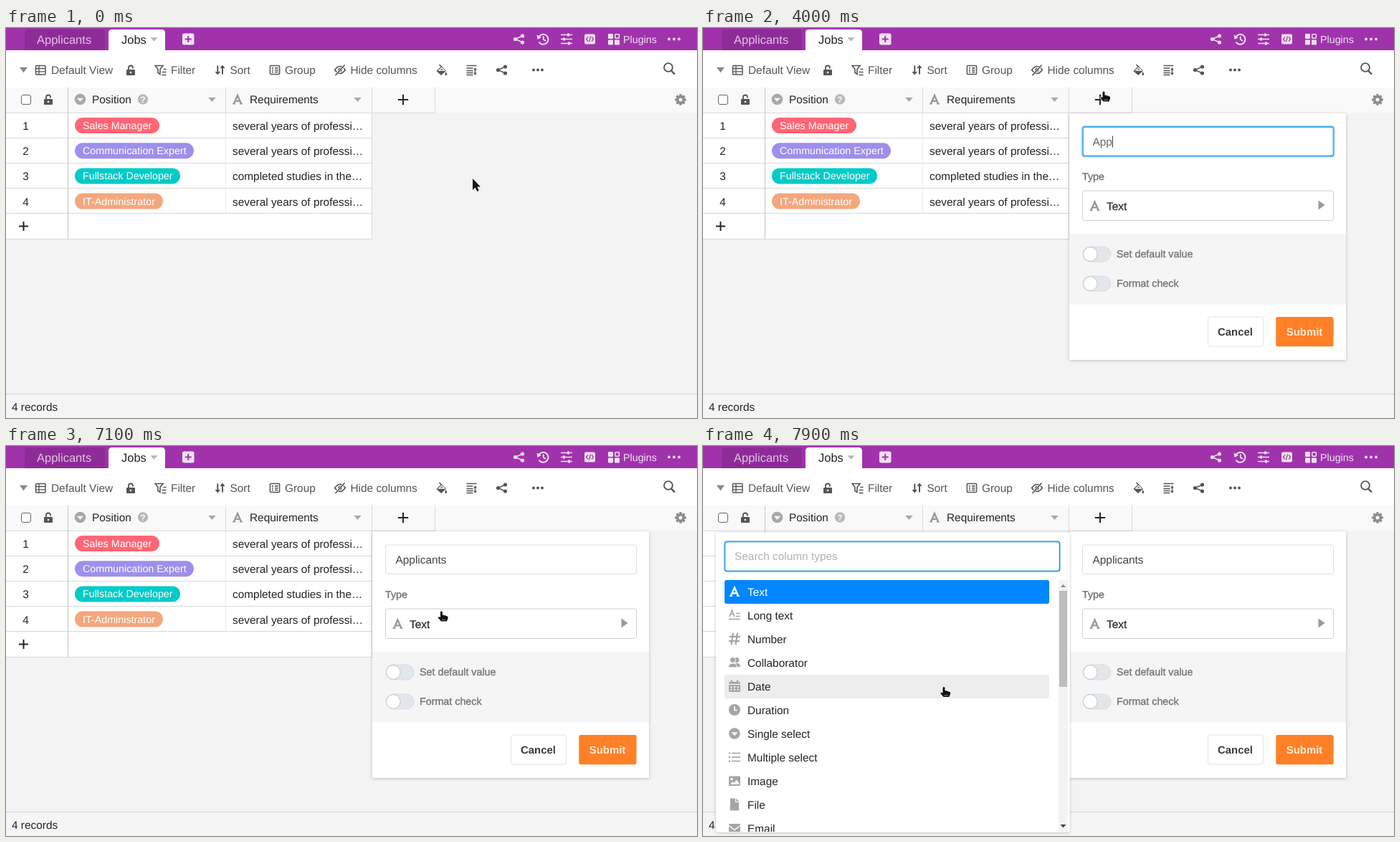
Write an HTML page that moves like this. It is 964 px wide and 544 px high and loops after 8000 ms.

```html
<!DOCTYPE html>
<html lang="en">
<head>
<meta charset="utf-8">
<title>Add a column</title>
<style>
html, body { margin: 0; width: 100%; height: 100%; overflow: hidden; background: #f4f4f4; }
svg { display: block; width: 964px; height: 544px; }
text { font-family: "Liberation Sans", Arial, sans-serif; font-size: 15.4px; text-rendering: geometricPrecision; white-space: pre; }
</style>
</head>
<body>
<svg id="stage" viewBox="0 0 964 544" xmlns="http://www.w3.org/2000/svg"></svg>
<script>
const PURPLE = '#a033ab', INK = '#212529', TOOL = '#555', GRAY = '#a8a8a8', LINE = '#d9d9d9';

// Drawing helpers
const rect = (x, y, w, h, fill, more = '') => `<rect x="${x}" y="${y}" width="${w}" height="${h}" fill="${fill}" ${more}/>`;
const box = (x, y, w, h, fill, stroke, r = 3, sw = 1) => rect(x, y, w, h, fill, `rx="${r}" stroke="${stroke}" stroke-width="${sw}"`);
const text = (x, y, s, fill = INK, size = 15.4, more = '') => `<text x="${x}" y="${y}" fill="${fill}" style="font-size:${size}px" ${more}>${s}</text>`;
const soft = c => `stroke="${c}" stroke-width=".35"`;
const path = (d, fill, more = '') => `<path d="${d}" fill="${fill}" ${more}/>`;
const line = (d, stroke, w = 1, more = '') => `<path d="${d}" fill="none" stroke="${stroke}" stroke-width="${w}" ${more}/>`;
const dot = (x, y, r, fill, more = '') => `<circle cx="${x}" cy="${y}" r="${r}" fill="${fill}" ${more}/>`;
const ring = (x, y, r, stroke, w) => dot(x, y, r, 'none', `stroke="${stroke}" stroke-width="${w}"`);
const at = (x, y, s) => `<g transform="translate(${x} ${y})">${s}</g>`;
const group = (id, s) => `<g id="${id}">${s}</g>`;
const down = (x, y, w, h, fill) => path(`M${x - w / 2} ${y - h / 2}h${w}l${-w / 2} ${h}z`, fill);
const plus = (x, y, r, c = INK, w = 2) => line(`M${x - r} ${y}h${2 * r}M${x} ${y - r}v${2 * r}`, c, w);
const dots = (x, y, gap, c) => [-gap, 0, gap].map(d => dot(x + d, y, 2, c)).join('');

// Icons, centred on 0,0
const icon = {
  share: c => line('M5-4.5L-5 0L5 4.5', c, 1.5) + dot(-5, 0, 2.6, c) + dot(5, -4.5, 2.6, c) + dot(5, 4.5, 2.6, c),
  lock: c => rect(-6, -1, 12, 8, c, 'rx="1"') + line('M-3-1V-3.5A3 3 0 0 1 3-3.5V-2.5', c, 1.8) + dot(0, 3, 1.3, '#fff'),
  letter: c => line('M-5 6L0-5.5L5 6M-3.5 2.4H3.5', c, 2.4) + line('M-7 6.2H-3M3 6.2H7', c, 1.4),
  select: c => dot(0, 0, 7.8, c) + down(0, .8, 9, 5, '#fff'),
  history: c => line('M-6.2-3A7 7 0 1 1-6 4', c, 2) + path('M-9-6L-8 .5L-2.5-2.5z', c) + line('M.3-4V.5L3.5 2.5', c, 1.8),
  sliders: c => line('M-8-6H8M-8 0H8M-8 6H8', c, 1.7) + rect(1, -8, 3, 4, c) + rect(-5, -2, 3, 4, c) + rect(2, 4, 3, 4, c),
  code: c => rect(-7.5, -7, 15, 14, c, 'rx="2"') + line('M-2.5-3L-5 0L-2.5 3M2.5-3L5 0L2.5 3M1-4L-1 4', PURPLE, 1.2),
  plugins: c => rect(-8, -7.5, 7, 7, c, 'rx="1"') + rect(-8, 1, 7, 7, c, 'rx="1"') + rect(1, 1, 7, 7, c, 'rx="1"') + box(1.8, -6.8, 5.6, 5.6, 'none', c, 1, 1.5),
  table: c => box(-6.5, -6, 13.5, 12.5, 'none', c, 1, 1.5) + line('M-6-2H7M-6 2.3H7M-2-6V6', c, 1.3),
  filter: c => line('M-7.3-6H3.5L-.5-1V6L-3.5 4V-1z', c, 1.6) + line('M4-1H8M2 3H8M2 7H8', c, 1.6),
  sort: c => line('M-3.2-6V5M3.5 6V-5', c, 2) + path('M-7 2.5H.5L-3.2 7z', c) + path('M0-2.5H7L3.5-7z', c),
  group: c => box(-6.6, -6, 13.2, 12, 'none', c, 1, 1.5) + line('M-4-2.6H-2M0-2.6H4.5M-4 .2H-2M0 .2H4.5M-4 3H-2M0 3H4.5', c, 1.6),
  eye: c => line('M-7.3 0Q0-10 7.3 0Q0 10-7.3 0z', c, 1.7) + dot(0, 0, 2.8, c) + line('M-6.5 7L7-7', '#fff', 3) + line('M-6.5 7.5L6.5-7', c, 1.7),
  bucket: c => path('M-7 1L0-6L6.5 .8L-.5 7z', c) + line('M-3-8L1-4', c, 1.6) + path('M6 2Q9.5 7 6.3 7Q3.6 7 6 2z', c) + line('M-3.5 0L.2-3.7L4 0z', '#fff', 1.3),
  height: c => line('M-7-6H7M-7-2.5H2M-7 1H2M-7 4H2M-7 7H2', c, 1.5) + line('M5-2V6', c, 1.3) + path('M2.6 0L5-3.5L7.4 0z', c) + path('M2.6 4L5 7.5L7.4 4z', c),
  gear: c => [0, 45, 90, 135].map(a => rect(-1.7, -7.8, 3.4, 15.6, c, `transform="rotate(${a})"`)).join('') + dot(0, 0, 6, c) + dot(0, 0, 2.5, '#f9f9f9'),
  long: c => line('M-7 2L-3.5-7L0 2M-6-1.5H-1', c, 1.6) + line('M2-2.5H8M2 1.5H8M-8 5.5H8', c, 1.5),
  number: c => line('M-2-8L-4.5 8M4-8L1.5 8M-7-3.2H8M-8 3.2H7', c, 2.2),
  people: c => dot(3, -3.5, 3.4, c) + path('M-2 6Q-1 1 3 1Q8 1 8 6z', c) + dot(-2.5, -3.5, 4, c, 'stroke="#fff"') + path('M-8.5 7Q-8.5 1-2.5 1Q3.5 1 3.5 7z', c, 'stroke="#fff"'),
  date: c => rect(-8, -6, 16, 14, c, 'rx="1.5"') + line('M-4-8.5V-4M4-8.5V-4', c, 2.2) + line('M-8-2.5H8', '#fff', 1.2) + line('M-5.5 1.2H6M-5.5 4.8H6', '#fff', 2, 'stroke-dasharray="2 2.6"'),
  clock: c => dot(0, 0, 8, c) + line('M0-5V.5H4', '#fff', 1.7),
  list: c => [-5.5, 0, 5.5].map(y => dot(-7, y, 1.3, c) + line(`M-4 ${y}H8`, c, 1.7)).join(''),
  image: c => rect(-8, -6.5, 16, 13.5, c, 'rx="1.5"') + dot(-4, -2.5, 1.8, '#fff') + path('M-6 5L-2.5 1L-.5 3L3-1.5L6.3 3V5z', '#fff'),
  file: c => path('M-6-8.5H1V-3H6V8.5H-6z', c) + path('M2.2-8.5L6-4.2H2.2z', c),
  mail: c => rect(-8, -6, 16, 13, c, 'rx="1.5"') + line('M-8-3.5L0 2.5L8-3.5', '#fff', 1.5)
};
const put = (name, x, y, c) => at(x, y, icon[name](c));

function topBar() {
  const c = '#f2e2f4', tab = (x, w, fill) => path(`M${x} 31V7q0-5 5-5h${w - 10}q5 0 5 5V31z`, fill);
  return rect(0, 0, 964, 31, PURPLE) + tab(26, 112, '#8d2c97') + tab(143, 79, '#fff')
    + text(43, 22, 'Applicants', '#e2c2e6', 16.5) + text(161, 22, 'Jobs', INK, 16.5) + down(206.5, 16, 10, 5.5, '#b5b5b5')
    + rect(246, 7.5, 16.5, 16, c, 'rx="2.5"') + plus(254.2, 15.5, 4.5, PURPLE)
    + put('share', 715.5, 15.5, c) + put('history', 749.5, 15.5, c) + put('sliders', 782, 15.5, c)
    + put('code', 814.5, 15.5, c) + put('plugins', 848, 15.5, c) + text(861, 21, 'Plugins', c, 14.3) + dots(932, 15.5, 7, c);
}

function toolBar() {
  const tools = [['table', 48, 'Default View', 63], ['filter', 215.5, 'Filter', 230], ['sort', 298.5, 'Sort', 312.5],
    ['group', 375, 'Group', 389], ['eye', 466, 'Hide columns', 480.5]];
  return rect(0, 31, 964, 52, '#fff') + down(24.5, 58.5, 11, 7.5, '#888')
    + tools.map(([n, x, s, tx]) => put(n, x, 58.5, TOOL) + text(tx, 64, s, TOOL)).join('')
    + put('lock', 174, 59, TOOL) + put('bucket', 607.5, 59, TOOL) + put('height', 649.5, 58.5, TOOL)
    + put('share', 691.5, 58.5, TOOL) + dots(742, 58.5, 6, TOOL)
    + ring(924, 55, 5.9, TOOL, 1.9) + line('M928 59.5L933 64.5', TOOL, 2.4);
}

function table() {
  const rows = [['Sales Manager', 118, '#ff6675'], ['Communication Expert', 166, '#9f8fec'],
    ['Fullstack Developer', 147, '#00cbc9'], ['IT-Administrator', 123, '#f4a77c']];
  const head = rect(0, 82.5, 964, 36, '#f9f9f9') + line('M0 82.5H964', '#e0e0e0')
    + box(21.5, 93.5, 13, 13, '#fff', '#666', 2.5) + put('lock', 59, 100, TOOL)
    + put('select', 103.5, 99.5, GRAY) + text(120, 105, 'Position')
    + dot(191, 99.5, 7.2, '#b8b8b8') + text(191, 104, '?', '#fff', 12, 'text-anchor="middle" font-weight="bold"')
    + down(287.5, 100, 10.5, 6, GRAY) + put('letter', 323, 99.5, '#999') + text(340, 105, 'Requirements')
    + down(490.5, 100, 10.5, 6, GRAY) + plus(554, 100, 7.2) + put('gear', 941, 100, '#8c8c8c');
  const body = rows.map(([s, w, c], i) => {
    const y = 136 + 35.2 * i;
    return text(27.5, y + 6, i + 1, INK, 15.4, 'text-anchor="middle"') + rect(96, y - 11, w, 22, c, 'rx="11"')
      + text(107, y + 5, s, '#fff', 14.3) + text(316, y + 6, i === 2 ? 'completed studies in the…' : 'several years of professi…');
  }).join('');
  return head + rect(0, 119, 511, 176, '#fff') + body + plus(24.5, 276.5, 6.5)
    + line('M0 118.5H599M0 153.5H511M0 188.5H511M0 223.5H511M0 258.5H511M0 294.5H511M510.5 83V295M598.5 83V119M306.5 83V119', LINE)
    + line('M306.5 119V258', '#ebebeb') + line('M86.5 83V295', '#c4c4c4')
    + rect(0, 510, 964, 34, '#f5f5f5') + line('M0 510.5H964', '#d5d5d5') + text(8, 534, '4 records');
}

function panel() {
  const label = '#747474';
  const toggle = y => box(530, y - 10.5, 39, 21, '#e3e7eb', '#d8dde1', 10.5) + dot(540.3, y, 9.8, '#fff', 'stroke="#c3c7cb"');
  return rect(511, 119, 386, 344, '#fff', 'filter="url(#shade)"') + rect(511, 287, 386, 98.5, '#f5f5f5')
    + box(529.5, 138, 350, 40.5, '#fff', '#dcdfe2')
    + group('focus', box(528.5, 137, 352, 42.5, 'none', '#c5e4f8', 4, 3) + box(530, 138, 349.5, 40.5, '#fff', '#43abea', 3, 1.8))
    + text(543.5, 164, '', '#666', 15.4, 'id="name"') + rect(0, 150.5, 1, 16, '#333', 'id="caret"')
    + text(529, 212, 'Type', label, 14.3, soft(label)) + box(529.5, 227, 350, 41.5, '#fff', '#cbd0d4')
    + put('letter', 546.5, 248, '#999') + text(563, 254, 'Text', '#333', 15.4, soft('#333')) + path('M858.5 240.5L867.5 247L858.5 253.5z', '#999')
    + toggle(315.5) + text(577, 320, 'Set default value', label, 14.3, soft(label))
    + toggle(356.5) + text(577, 361, 'Format check', label, 14.3, soft(label))
    + box(704.5, 403, 77, 41, '#fff', '#e4e4e4') + text(742.5, 429, 'Cancel', '#3a3a3a', 14.9, 'font-weight="bold" text-anchor="middle"')
    + rect(799.3, 403, 80.2, 41.3, '#ff8026', 'rx="2.5"') + text(839, 429, 'Submit', '#ffeede', 14.9, 'font-weight="bold" text-anchor="middle"');
}

function typeList() {
  const types = [['letter', 'Text'], ['long', 'Long text'], ['number', 'Number'], ['people', 'Collaborator'], ['date', 'Date'],
    ['clock', 'Duration'], ['select', 'Single select'], ['list', 'Multiple select'], ['image', 'Image'], ['file', 'File'], ['mail', 'Email']];
  const items = types.map(([n, s], i) => {
    const y = 203.5 + 33 * i;
    return put(n, 44, y - .5, i ? '#a5a5a5' : '#fff') + text(62, y + 5.5, s, i ? INK : '#fff');
  }).join('');
  return rect(18, 121, 493.5, 417.5, '#fff', 'rx="2" filter="url(#shade)"')
    + box(30.5, 133.5, 467, 41, '#fff', '#dde0e4')
    + group('searchFocus', box(29.5, 132.5, 469, 43, 'none', '#cfe9fb', 4, 2) + box(30.5, 133.5, 467, 41, '#fff', '#1991eb', 3, 1.5))
    + text(44, 159, 'Search column types', '#aeb2b9') + rect(44, 145.5, 1, 16, '#222', 'id="searchCaret"')
    + `<g clip-path="url(#list)">` + rect(30, 187, 453, 33, '#0086ff', 'rx="3"')
    + rect(30, 0, 453, 33, '#ededed', 'id="hover" rx="2"') + items + '</g>'
    + rect(496, 187, 13, 351, '#f3f3f3') + rect(497, 202, 11, 134, '#bdbdbd')
    + path('M499 197L502.5 193L506 197z', '#888') + path('M498.5 528L506.5 528L502.5 532.5z', '#444');
}

function pointers() {
  const edge = 'stroke="#fff" stroke-width="1.6" paint-order="stroke" stroke-linejoin="round"';
  return group('pointer',
    group('arrow', path('M0 0V16L3.7 12.5L6.3 18L8.8 17L6.4 11.5H11z', '#111', edge))
    + group('hand', path('M-1.5 1.5Q0-.5 1.5 1.5V6Q3.3 5 4.2 6.6Q6 5.8 6.8 7.4Q9.5 7 9 10.5L7.5 14.5H-.5L-4.6 9.8Q-4.5 7.3-1.5 9z', '#111', edge) + line('M0 12.3H6', '#999', .9))
    + group('beam', line('M-3-8H3M-3 8H3M0-8V8', '#fff', 3) + line('M-3-8H3M-3 8H3M0-8V8', '#222', 1.2)));
}

const stage = document.getElementById('stage');
stage.innerHTML = `<defs><filter id="shade" x="-10%" y="-10%" width="120%" height="120%">
  <feDropShadow dx="0" dy="1" stdDeviation="2.2" flood-color="#000" flood-opacity=".22"/></filter>
  <clipPath id="list"><rect x="18" y="180" width="479" height="358"/></clipPath></defs>`
  + rect(0, 0, 964, 544, '#f3f3f3') + table() + group('panel', panel()) + group('types', typeList()) + toolBar() + topBar() + pointers();

// Timing
const LOOP = 8000, STEP = 100, PANEL = 1700, BLUR = 7100, LIST = 7200;
// Each move: start, end, then the three points of a quadratic curve
const START = [651, 210], PLUS = [559, 88], TYPE = [607.5, 230], DATE = [336, 335.5];
const moves = [[400, 1100, START, [600, 222], PLUS], [6300, 6900, PLUS, [1102, 225], TYPE], [LIST, 7900, TYPE, [472, 283], DATE]];
const typed = [[3400, 1], [3500, 2], [4000, 3], [4600, 4], [4900, 5], [5000, 6], [5200, 7], [5300, 8], [5500, 9], [5700, 10]];
const blinks = [[PANEL, 1], [2100, 0], [2700, 1], [3300, 0], [3400, 1], [6300, 0], [6900, 1], [BLUR, 0]];
const $ = id => document.getElementById(id);
const show = (id, on) => $(id).setAttribute('visibility', on ? 'inherit' : 'hidden');
const lastOf = (steps, t) => steps.reduce((v, [from, next]) => t >= from ? next : v, 0);

function pointerAt(t) {
  const [from, to, a, b, c] = moves.filter(m => t >= m[0]).pop() || moves[0];
  const p = Math.min(1, Math.max(0, (t - from) / (to - from))), e = p * p * (3 - 2 * p), r = 1 - e;
  return a.map((v, i) => r * r * v + 2 * r * e * b[i] + e * e * c[i]);
}

function pointerKind(x, y, t) {
  const inside = (l, top, r, bottom) => x > l && x < r && y > top && y < bottom;
  if (inside(511, 83, 599, 118)) return 'hand';
  if (t < PANEL) return 'arrow';
  if (inside(529, 137, 880, 179)) return 'beam';
  return inside(529, 226, 880, 269) || inside(30, 187, 483, 538) ? 'hand' : 'arrow';
}

function draw(t) {
  const shown = t >= PANEL, blurred = t >= BLUR, open = t >= LIST, count = lastOf(typed, t), name = $('name');
  show('panel', shown);
  show('types', open);
  if (shown) {
    name.textContent = count ? 'Applicants'.slice(0, count) : 'Column name';
    name.setAttribute('fill', !count ? '#b9bcc1' : blurred ? '#444' : '#666');
    $('caret').setAttribute('x', 543.5 + (count ? name.getComputedTextLength() : 0));
  }
  show('focus', shown && !blurred);
  show('caret', lastOf(blinks, t));
  show('searchCaret', open && t < LIST + 600);
  show('searchFocus', t > LIST);

  const [x, y] = pointerAt(t), kind = pointerKind(x, y, t), row = Math.floor((y - 187) / 33);
  $('pointer').setAttribute('transform', `translate(${x} ${y})`);
  for (const k of ['arrow', 'hand', 'beam']) show(k, k === kind);
  show('hover', open && x > 30 && x < 483 && row > 0);
  $('hover').setAttribute('y', 187 + 33 * row);
}

const start = performance.now();
function tick() {
  const t = (performance.now() - start) % LOOP;
  draw(Math.floor(t / STEP) * STEP);
  requestAnimationFrame(tick);
}
tick();
</script>
</body>
</html>
```
